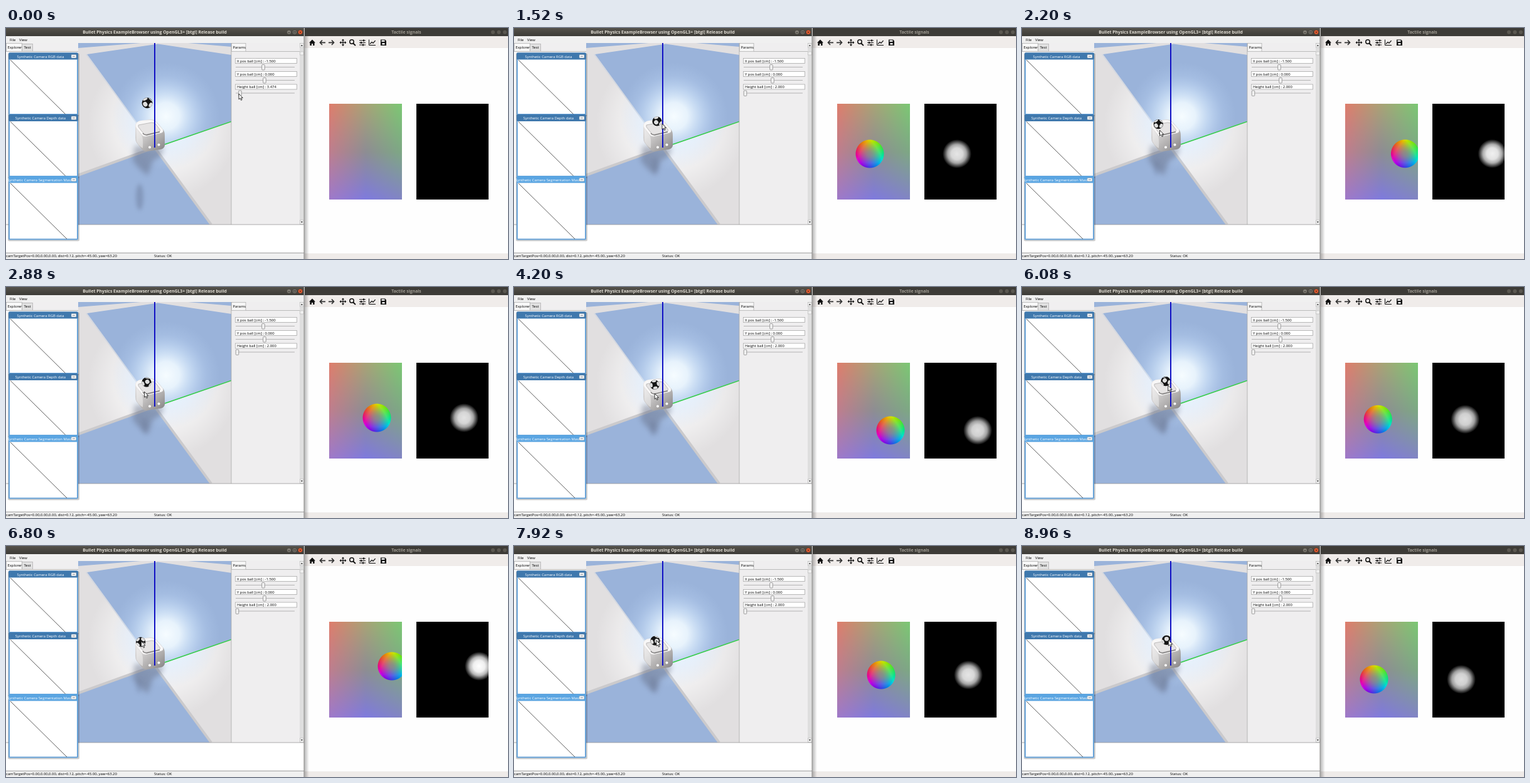
These frames come from a looping animation (800 by 369 pixels, 9000 ms). An HTML page with a canvas:

```html
<!DOCTYPE html>
<html lang="en">
<head>
<meta charset="utf-8">
<title>Tactile signals</title>
<style>
  html, body { margin: 0; width: 100%; height: 100%; overflow: hidden; background: #fefefe; }
  svg, canvas { position: absolute; display: block; }
  #stage { left: 0; top: 0; }
  #tactile { left: 515px; top: 121px; }
  text { font: 5.9px "Open Sans", sans-serif; fill: #000; }
  .title { font-size: 6.85px; font-weight: 700; text-anchor: middle; fill: #dfdbd2; }
  .caption { text-anchor: middle; fill: #fff; }
</style>
</head>
<body>
<svg id="stage" width="800" height="369" viewBox="0 0 800 369">
  <defs>
    <radialGradient id="glow" gradientUnits="userSpaceOnUse" cx="255" cy="141" r="86">
      <stop offset="0" stop-color="#f6fcff"/>
      <stop offset=".25" stop-color="#eef8ff" stop-opacity=".92"/>
      <stop offset=".5" stop-color="#d9ecff" stop-opacity=".58"/>
      <stop offset=".75" stop-color="#c4dcfa" stop-opacity=".24"/>
      <stop offset="1" stop-color="#b8d2f4" stop-opacity="0"/>
    </radialGradient>
    <radialGradient id="floor" gradientUnits="userSpaceOnUse" cx="250" cy="155" r="120">
      <stop offset="0" stop-color="#fff"/>
      <stop offset=".4" stop-color="#fff" stop-opacity=".75"/>
      <stop offset="1" stop-color="#fff" stop-opacity="0"/>
    </radialGradient>
    <radialGradient id="press">
      <stop offset="0" stop-color="#fff"/>
      <stop offset=".4" stop-color="#fff" stop-opacity=".94"/>
      <stop offset=".65" stop-color="#fff" stop-opacity=".72"/>
      <stop offset=".85" stop-color="#fff" stop-opacity=".3"/>
      <stop offset="1" stop-color="#fff" stop-opacity="0"/>
    </radialGradient>
    <linearGradient id="bar" x2="0" y2="1">
      <stop offset="0" stop-color="#55524b"/><stop offset="1" stop-color="#3c3b37"/>
    </linearGradient>
    <linearGradient id="edge">
      <stop offset="0" stop-opacity=".3"/><stop offset="1" stop-opacity="0"/>
    </linearGradient>
    <linearGradient id="body" x2=".8" y2="1">
      <stop offset="0" stop-color="#eeecec"/><stop offset=".4" stop-color="#d2d0d0"/>
      <stop offset=".75" stop-color="#aeacac"/><stop offset="1" stop-color="#8f8d8e"/>
    </linearGradient>
    <filter id="soft" x="-60%" y="-60%" width="220%" height="220%"><feGaussianBlur stdDeviation="4"/></filter>
    <filter id="softer" x="-60%" y="-60%" width="220%" height="220%"><feGaussianBlur stdDeviation="3"/></filter>
    <clipPath id="view"><path d="M115 24H359V314H115Z"/></clipPath>
  </defs>

  <rect width="800" height="369" fill="#fefefe"/>

  <g clip-path="url(#view)">
    <path d="M115 24H359V314H115Z" fill="#e1dfe0"/>
    <path d="M115 24H359V314H115Z" fill="url(#floor)"/>
    <g fill="#9ab3da">
      <path d="M129 42L242 25.5L359 43V149L237 191Z"/>
      <path d="M115 236L237 191L326 314H115Z"/>
      <path d="M115 32L215 24H115ZM290 24H359V30Z"/>
    </g>
    <path d="M115 235L237 191L327 314" fill="none" stroke="#cbcacc" stroke-width="4"/>
    <path d="M128 42L237 191" stroke="#d3d8e1" stroke-width="2"/>
    <path d="M115 24H359V314H115Z" fill="url(#glow)"/>
    <path d="M205 188L252 191L246 206L234 212L226 236L212 224L202 212Z" fill="#5d6478" opacity=".42" filter="url(#soft)"/>
    <ellipse id="shadow" fill="#5d6a88" filter="url(#softer)"/>
    <path d="M237 191.5L359 149.5" stroke="#35cc48" stroke-width="1.6"/>
    <path d="M206 155Q207 149 215 148L230 146Q236 146 240 150L251 163Q253 166 253 172V188Q252 193 246 194L225 197Q219 198 215 192L208 183Q206 180 206 175Z" fill="url(#body)"/>
    <path d="M207 154Q209 149 216 148L230 147Q236 147 240 151L250 162Q252 167 246 168L224 173Q219 174 216 170L208 160Q206 157 207 154Z" fill="#f8f7f7"/>
    <path d="M208 161L216 171Q219 175 218 192Q211 188 208 181Z" fill="#fff" opacity=".4"/>
    <path d="M211 155L232 151Q237 151 239 154L245 162Q247 165 242 166L224 170Q220 170 218 167L211 158Z" fill="#e6e4e4" stroke="#aaa8a8" stroke-width=".7"/>
    <path d="M218 168Q220 171 224 171L245 166" fill="none" stroke="#7d7b7b" stroke-width="1.3"/>
    <g fill="#fff"><circle cx="229" cy="190.5" r="2"/><circle cx="243.5" cy="186.5" r="2"/></g>
    <g id="ball"></g>
    <path d="M237 24V191" stroke="#1212c4" stroke-width="2"/>
  </g>

  <g id="chrome"></g>

  <svg x="654" y="121" width="115" height="153">
    <rect width="115" height="153"/>
    <circle id="depth" fill="url(#press)"/>
  </svg>

  <path id="cursor" d="M0 0V9L2.1 7.2L3.6 10.4L5.1 9.7L3.7 6.6H6.4Z" fill="#fff" stroke="#222" stroke-width=".9"/>
</svg>
<canvas id="tactile" width="116" height="153"></canvas>

<script>
const LOOP = 9000, STEP = 40;
const $ = id => document.getElementById(id);
const clamp = (x, a = 0, b = 1) => Math.min(b, Math.max(a, x));
const mix = (a, b, k) => a + (b - a) * k;
const ease = k => (k = clamp(k), k * k * (3 - 2 * k));

const rect = (x, y, w, h, fill, extra = '') =>
  `<rect x="${x}" y="${y}" width="${w}" height="${h}" fill="${fill}" ${extra}/>`;
const text = (x, y, s, extra = '') => `<text x="${x}" y="${y}" ${extra}>${s}</text>`;
const line = (d, color = '#bbb', w = 1) => `<path d="${d}" fill="none" stroke="${color}" stroke-width="${w}"/>`;
const button = (x, fill) => `<circle cx="${x}" cy="6.7" r="3.6" fill="${fill}" stroke="#33312d" stroke-width=".6"/>`;

function cameraWindow(y, h, name, color) {
  return rect(3, y + 1, 114, h + 1, '#000', 'rx="2" opacity=".2"') +
    rect(4, y, 111, h, '#69a3d8', 'rx="2"') +
    rect(4, y, 111, 11, color, 'rx="2"') +
    rect(6, y + 11, 107, h - 13, '#fff') +
    text(name.length > 30 ? 54 : 55, y + 8, name, 'class="caption"') +
    rect(104, y + 3, 8, 5.5, '#f4f7fa', 'rx="1" stroke="#789" stroke-width=".5"') +
    line(`M106 ${y + 5.8}h4`, '#777', .8) +
    line(`M7 ${y + 11.5}l${h - 12} ${h - 13}`, '#333', .8);
}

function slider(y, label, x, id) {
  return rect(365.5, y + .5, 98, 8, '#fff', 'stroke="#aaa" stroke-width=".8"') +
    text(368, y + 6.7, label, `id="${id}Label"`) +
    line(`M366 ${y + 14.5}H460`, '#b4b4b4', 1.2) +
    rect(-2.3, y + 10.5, 4.6, 8.5, '#f2f2f2', `id="${id}Thumb" transform="translate(${x})" rx="1" stroke="#888" stroke-width=".8"`);
}

function icons() {
  const dark = '#111';
  return `<g fill="${dark}">
    <path d="M483 23.5L488 18.5L493 23.5H491.6V28H489V25H487V28H484.4V23.5Z"/>
    <path d="M537 17.5l2.2 2.6h-4.4zM537 29l2.2-2.6h-4.4zM531.5 23.2l2.6-2.2v4.4zM542.5 23.2l-2.6-2.2v4.4z"/>
    <path d="M597 18.5h7l2 2V28h-9z"/></g>` +
    line('M504 19.5L500.5 23.3L504 27M500.5 23.3H509', '#333', 1.7) +
    line('M519 19.5L522.5 23.3L519 27M522.5 23.3H514', '#333', 1.7) +
    line('M537 19v8.5M533 23.2h8', dark, 1.2) +
    `<circle cx="551" cy="22" r="3.2" fill="none" stroke="${dark}" stroke-width="1.5"/>` +
    line('M553.3 24.5L557 28.2', dark, 1.9) +
    line('M563 20h10M563 23.5h10M563 27h10', dark, 1.1) +
    line('M570 18.6v2.8M566 22.1v2.8M569 25.6v2.8', dark, 1.8) +
    line('M578.5 18.5V27.5H589', dark, 1) + line('M580 25.5l3-3l2 1.6l3.6-4', dark, 1.3) +
    rect(598.5, 19.5, 5, 2.4, '#fff') + rect(599.5, 24, 4, 2.6, '#fff');
}

$('chrome').innerHTML = [
  // simulator window
  rect(0, 0, 475, 13, 'url(#bar)'),
  text(237, 9.2, 'Bullet Physics ExampleBrowser using OpenGL3+ [btgl] Release build', 'class="title"'),
  button(451, '#7d7a72'), button(460, '#7d7a72'), button(469, '#ee5f33'),
  line('M449.5 7.5h3', '#33312d', .8), rect(458.7, 5.4, 2.6, 2.6, 'none', 'stroke="#33312d" stroke-width=".7"'),
  line('M467.6 5.3l2.8 2.8m0-2.8l-2.8 2.8', '#40200f', .8),
  rect(0, 13, 475, 11, '#f0f0f0'), text(6, 21, 'File'), text(21, 21, 'View'),
  rect(0, 24, 115, 290, '#f0eff0'), rect(0, 314, 475, 45, '#fff'),
  rect(25.5, 25.5, 17, 12, '#e2e2e2', 'stroke="#aaa" stroke-width=".7"'),
  rect(.5, 24.5, 25, 13, '#f8f8f8', 'stroke="#aaa" stroke-width=".7"'),
  text(2.5, 32.5, 'Explorer'), text(28.5, 33, 'Test'), line('M0 37.5H115'),
  rect(0, 38, 4, 276, '#fafafa'),
  rect(359, 24, 109, 290, '#efeeef'), line('M359 24V314', '#aaa', .8),
  line('M382 37.5H468'), rect(359.5, 24.5, 22.5, 13, '#f6f6f6', 'stroke="#aaa" stroke-width=".7"'),
  text(361.5, 32.5, 'Params'),
  slider(48, 'X pos ball [cm] : -1.500', 410, 'x'),
  slider(69, 'Y pos ball [cm] : 0.000', 412, 'y'),
  slider(89.5, 'Height ball [cm] : 3.474', 373, 'h'),
  rect(468, 24, 6.5, 290, '#dedede'),
  rect(468.3, 24.5, 6, 6.5, '#f0f0f0', 'stroke="#aaa" stroke-width=".5"'),
  rect(468.3, 38, 6, 5, '#f0f0f0', 'stroke="#aaa" stroke-width=".5"'),
  rect(468.3, 307, 6, 6.5, '#f0f0f0', 'stroke="#aaa" stroke-width=".5"'),
  '<path d="M469.8 29l1.6-2.6l1.6 2.6zM469.8 309l1.6 2.6l1.6-2.6z" fill="#444"/>',
  line('M0 314H475', '#999', .8), rect(0, 359, 475, 10, '#f0f0f0'), line('M0 359.3H475', '#888', .8),
  text(0, 366.3, 'camTargetPos=0.00,0.00,0.00, dist=0.12, pitch=-45.00, yaw=63.20'),
  text(236, 366.3, 'Status: OK'),
  cameraWindow(39.5, 99.5, 'Synthetic Camera RGB data', '#3f78ad'),
  cameraWindow(138, 100, 'Synthetic Camera Depth data', '#3f78ad'),
  cameraWindow(236.5, 102, 'Synthetic Camera Segmentation Mask', '#5aa5e2'),
  // plot window
  rect(476, 0, 324, 13, '#3d3b37'), text(638, 9.4, 'Tactile signals', 'class="title" style="fill:#a09c93"'),
  [776, 785.5, 795].map(x => button(x, '#5b5851')).join(''),
  rect(476, 13, 324, 19, '#f0ecea'), rect(476, 360, 324, 9, '#efebe9'),
  icons(), rect(475, 13, 8, 356, 'url(#edge)'), line('M475 0V369', '#8a8886', 1)
].join('');

// Contact centre over time: t, x, y, pressure
const track = [
  [480, 573, 197, .88], [1000, 573, 198, .89], [1520, 567, 201, .9], [1840, 600, 199, .9],
  [2300, 612, 201, .95], [2880, 591, 209, .89], [3300, 612, 222, .92], [3720, 604, 228, .88],
  [4200, 600, 229, .87], [4640, 572, 231, .84], [5360, 553, 233, .81], [5900, 560, 216, .85],
  [6440, 588, 198, .92], [6800, 615, 192, 1], [7360, 600, 198, .92], [7900, 585, 206, .9],
  [8320, 600, 208, .9], [8560, 611, 210, .94], [8960, 561, 213, .87]
];
// Pointer offset from the ball: t, dx, dy
const grip = [[1520, 8, 4], [2880, -3.5, 15], [4200, 0, 14], [5360, 6.5, 14], [6800, 1, -1], [8960, 3, 0]];

function sample(keys, t) {
  t = clamp(t, keys[0][0], keys.at(-1)[0]);
  const i = clamp(keys.findIndex(k => k[0] >= t), 1, keys.length - 1);
  const a = keys[i - 1], b = keys[i], k = ease((t - a[0]) / (b[0] - a[0]));
  return a.slice(1).map((v, j) => mix(v, b[j + 1], k));
}

function ballAt(u, v, lift) {
  const du = u - 567, dv = v - 201, over = Math.max(0, u - 600);
  return [228 - .2 * du + .1 * dv - .19 * over - 1.4 * lift,
          149 + .08 * du + .16 * dv + .12 * over - 29 * lift];
}

// White patches sit at the corners of a cube inside the black ball
const CORNERS = Array.from({ length: 8 }, (_, i) =>
  [1, 2, 4].map(bit => (i & bit ? 1 : -1) / Math.sqrt(3)));

function drawBall(x, y, r, yaw, pitch) {
  const open = .48, [cy, sy, cp, sp] = [Math.cos(yaw), Math.sin(yaw), Math.cos(pitch), Math.sin(pitch)];
  const patches = CORNERS.map(([a, b, c]) => {
    const px = a * cy + c * sy, q = c * cy - a * sy, py = b * cp - q * sp, pz = b * sp + q * cp;
    if (pz < .05) return '';
    const s = r * Math.cos(open), w = r * Math.sin(open);
    return `<ellipse rx="${w * pz}" ry="${w}" fill="#dedede" transform="translate(${px * s} ${py * s}) rotate(${Math.atan2(py, px) * 180 / Math.PI})"/>`;
  }).join('');
  $('ball').setAttribute('transform', `translate(${x} ${y})`);
  $('ball').innerHTML = `<circle r="${r}" fill="#141414"/>${patches}`;
}

const ctx = $('tactile').getContext('2d'), W = 116, H = 153;
const image = ctx.createImageData(W, H);
const tints = [
  [[222, 125, 108], [168, 163, 118], [122, 200, 116]],
  [[190, 126, 142], [141, 141, 147], [125, 168, 132]],
  [[158, 121, 202], [126, 122, 222], [130, 132, 196]]
];
function gelColor(x, y) {
  const gx = x / W * 2, gy = y / H * 2, i = Math.min(1, gx | 0), j = Math.min(1, gy | 0);
  return [0, 1, 2].map(c => mix(
    mix(tints[j][i][c], tints[j][i + 1][c], gx - i),
    mix(tints[j + 1][i][c], tints[j + 1][i + 1][c], gx - i), gy - j));
}
const gel = Array.from({ length: W * H }, (_, p) => gelColor(p % W, p / W | 0));

// Red, green and blue lights shine from upper left, upper right and below
const LIGHTS = [-1, 1, 3].map(k => k * Math.PI / 3);

function drawTactile(cx, cy, R) {
  gel.forEach((base, p) => {
    const dx = p % W + .5 - cx, dy = (p / W | 0) + .5 - cy, d = Math.hypot(dx, dy);
    const cover = clamp(R - d + .5), tilt = R ? Math.min(1, d / R) ** 1.4 : 0;
    const angle = Math.atan2(dx, -dy);
    for (let c = 0; c < 3; c++) {
      const lit = clamp(138 + 165 * tilt * Math.cos(angle - LIGHTS[c]), 0, 228);
      image.data[p * 4 + c] = mix(base[c], lit, cover);
    }
    image.data[p * 4 + 3] = 255;
  });
  ctx.putImageData(image, 0, 0);
}

function set(id, attrs) {
  for (const name in attrs) $(id).setAttribute(name, attrs[name]);
}

function render(t) {
  const drop = k => 1 - ease((k + 60) / 540);
  const up = drop(t) / drop(0);
  const [u, v, force] = sample(track, t);
  const touch = ease((t - 330) / 230);
  const [bx, by] = ballAt(mix(u, 573, up), mix(v, 197, up), up);

  drawBall(bx, by, 7.6 + .9 * up, (573 - u) / 22 + .25, (v - 197) / 22 + .2 + up * .2);
  set('shadow', {
    cx: mix(bx - 3, 213, up), cy: mix(by + 70, 270, up),
    rx: mix(5, 6, up), ry: mix(12, 21, up), opacity: mix(.2, .38, up)
  });

  set('depth', { cx: u - 515, cy: v - 121, r: 23 * touch, opacity: force * touch });
  drawTactile(u - 515, v - 121, 22.5 * touch);

  set('hThumb', { transform: `translate(${mix(368.5, 373, up)})` });
  $('hLabel').textContent = `Height ball [cm] : ${(2 + 1.474 * up).toFixed(3)}`;

  const [dx, dy] = sample(grip, t), away = ease((t - 640) / 620);
  const mx = mix(mix(366, 371, up), bx + dx, away), my = mix(105, by + dy, away);
  set('cursor', { transform: `translate(${mx} ${my})` });
}

function tick() {
  render(Math.floor(performance.now() % LOOP / STEP) * STEP);
  requestAnimationFrame(tick);
}
tick();
</script>
</body>
</html>
```
